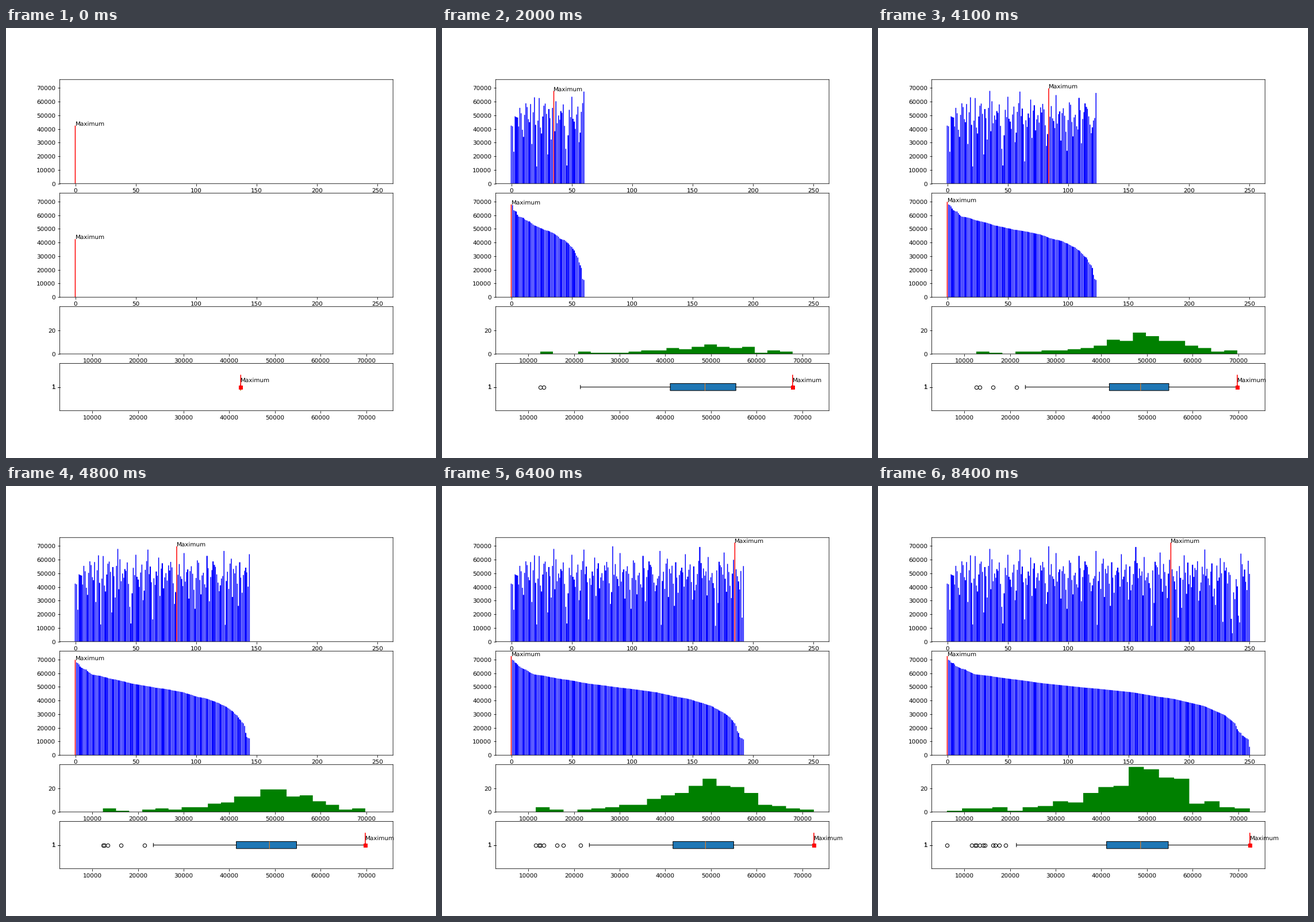
Write a matplotlib script that moves like this. It is 748x748 px and loops after 8500 ms.

```python
import numpy as np
import matplotlib.pyplot as plt
from matplotlib.animation import FuncAnimation

COUNT, STEP, FRAMES = 251, 3, 85
LOW, HIGH = 6157, 72555

# New maxima and low outliers by position, in thousands
RECORDS = {0: 42.5, 3: 49.3, 7: 55.5, 12: 58.8, 19: 63.2, 35: 67.9,
           84: 69.8, 185: HIGH / 1000}
DIPS = {21: 12.6, 30: 21.4, 46: 13.3, 64: 16.3, 124: 12.3, 169: 11.6,
        191: 17.6, 228: 14.5, 235: 16.7, 236: LOW / 1000, 241: 19, 242: 14.1}

# Key points of the sorted curve for all other values
RANKS = [0, 9, 26, 50, 83, 155, 174, 211, 227, 231]
LEVELS = [23, 29.4, 36, 41, 46, 52.6, 54.8, 59.3, 65.9, 70.1]

plt.rcParams["path.snap"] = False
plt.rcParams["text.hinting"] = "none"


def make_values():
    values = np.zeros(COUNT)
    for i, v in RECORDS.items():
        values[i] = v * 1000
    record = np.maximum.accumulate(values)
    for i, v in DIPS.items():
        values[i] = v * 1000

    free = values == 0
    n = free.sum()
    pool = np.interp(np.arange(n) + 0.5, RANKS, LEVELS) * 1000
    # Evenly mixed order, jittered so that it looks random
    rng = np.random.default_rng(7)
    order = np.argsort(np.arange(n) + rng.uniform(0, 9, n))
    mix = np.argsort(np.argsort(order * 0.6180339887 % 1))
    values[free] = np.minimum(pool[mix], record[free] - 500)
    return values


values = make_values()

fig = plt.figure(figsize=(10, 10), dpi=74.8)
grid = (6, 1)
ax_raw = plt.subplot2grid(grid, (0, 0), rowspan=2)
ax_sort = plt.subplot2grid(grid, (2, 0), rowspan=2)
ax_hist = plt.subplot2grid(grid, (4, 0))
ax_box = plt.subplot2grid(grid, (5, 0))

X_MIN, X_MAX = -12.94, 262.94


def align(x):
    """Round bar edges to whole steps of a 1000-unit wide figure."""
    unit = (X_MAX - X_MIN) / 775
    return X_MIN + np.floor((x - X_MIN) / unit + 0.5) * unit


def setup_bars(ax):
    left = align(np.arange(COUNT) - 0.4)
    right = align(np.arange(COUNT) + 0.4)
    bars = ax.bar(left, np.zeros(COUNT), right - left, align="edge")
    ax.set_xlim(X_MIN, X_MAX)
    ax.set_ylim(0, HIGH * 1.05)
    return bars, ax.text(0, 0, "Maximum")


raw_bars, raw_label = setup_bars(ax_raw)
sort_bars, sort_label = setup_bars(ax_sort)

margin = 0.05 * (HIGH - LOW)
for ax in (ax_hist, ax_box):
    ax.set_xlim(LOW - margin, HIGH + margin)
ax_hist.set_ylim(0, 39.9)
ax_hist.set_yticks([0, 20])
ax_box.set_ylim(0.5, 1.5)
ax_box.set_yticks([1] * 8, ["1"] * 8)  # stacked ticks look bold

pointer, = ax_box.plot([0, 0], [1, 1.25], color="red", marker="s",
                       markevery=[0], zorder=5)
box_label = ax_box.text(0, 1.1, "Maximum", zorder=6)
temp = []


def show_bars(bars, label, data):
    top = int(np.argmax(data))
    for i, bar in enumerate(bars):
        bar.set_visible(i < len(data))
        if i < len(data):
            bar.set_height(data[i])
            bar.set_facecolor("red" if i == top else "blue")
    label.set_position((top, data[top]))


def update(frame):
    data = values[:STEP * frame + 1]
    peak = data.max()
    show_bars(raw_bars, raw_label, data)
    show_bars(sort_bars, sort_label, np.sort(data)[::-1])

    while temp:
        temp.pop().remove()
    temp.extend(ax_hist.hist(data, bins=20, color="green",
                             histtype="stepfilled")[2])
    parts = ax_box.boxplot(data, vert=False, patch_artist=True,
                           manage_ticks=False)
    for group in parts.values():
        temp.extend(group)

    pointer.set_xdata([peak, peak])
    box_label.set_x(peak)
    return []


anim = FuncAnimation(fig, update, frames=FRAMES, interval=100,
                     repeat=True, repeat_delay=0, blit=False)
plt.show()
```
